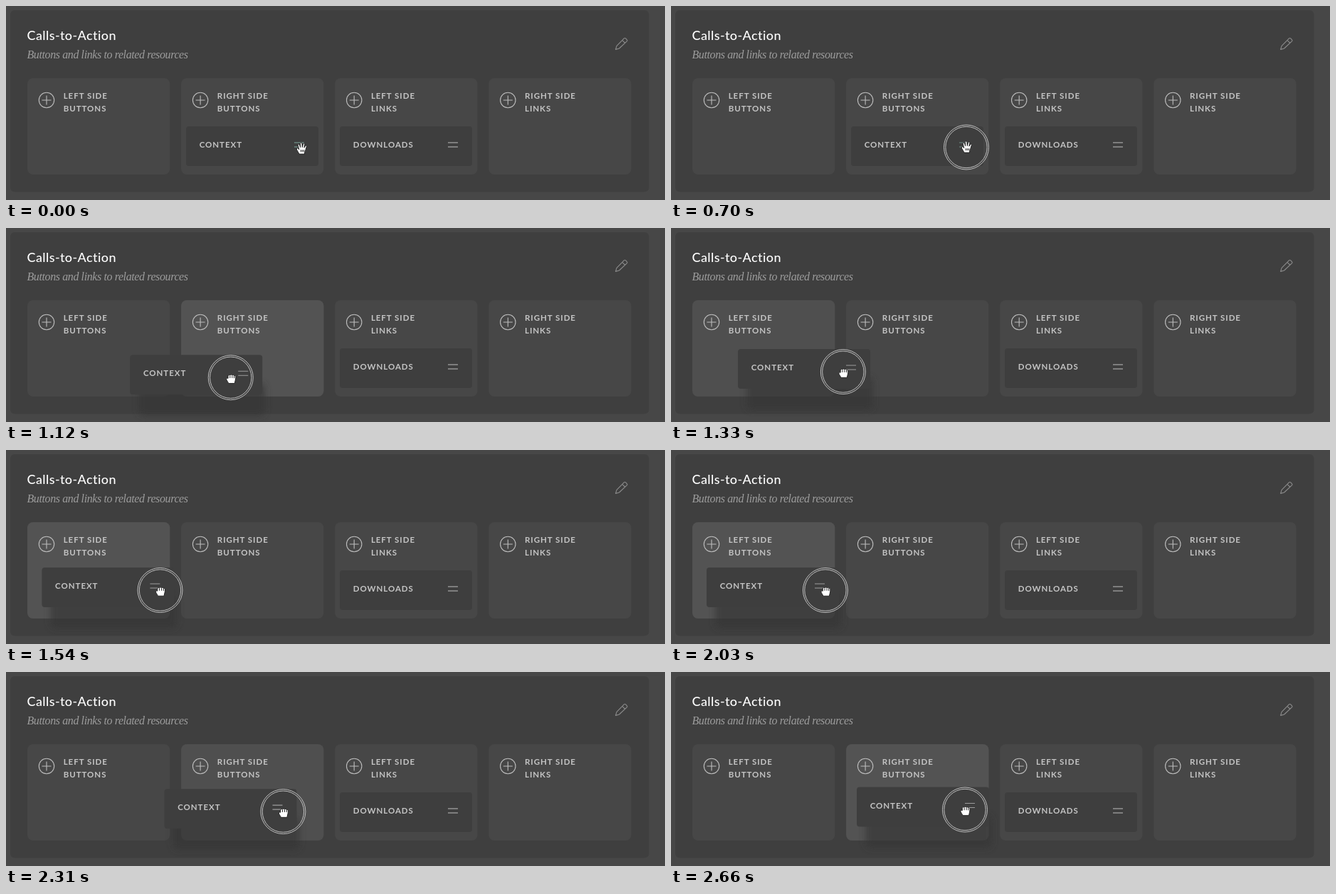
An HTML page that plays this animation: 926x274 px, repeating every 2.8 s.

```html
<!DOCTYPE html>
<html lang="en">
<head>
<meta charset="utf-8">
<title>Drag between columns</title>
<style>
html, body { margin: 0; width: 100%; height: 100%; overflow: hidden; background: #474747; }
svg { display: block; width: 926px; height: 274px; }
.title { font: 500 18px Lato, sans-serif; letter-spacing: .4px; fill: #fff; }
.sub { font: italic 16px "Liberation Serif", serif; letter-spacing: -.4px; fill: #9c9c9c; }
.label { font: 700 11.5px Lato, sans-serif; letter-spacing: .95px; fill: #c4c4c4; }
.line { fill: none; stroke: #bdbdbd; stroke-width: 1.1; }
.ring { fill: none; stroke: #cfcfcf; stroke-width: .9; }
.pencil { fill: none; stroke: #8c8c8c; stroke-width: 1.1; stroke-linejoin: round; }
.hand { fill: #fff; stroke: #222; stroke-width: 1; stroke-linejoin: round; }
</style>
</head>
<body>
<svg viewBox="0 0 926 274">
  <defs>
    <filter id="blur" x="-20%" y="-60%" width="140%" height="220%"><feGaussianBlur stdDeviation="5"/></filter>
  </defs>
  <rect x="6" y="6" width="897.5" height="256.5" rx="6" fill="#3f3f3f"/>
  <text class="title" x="29.5" y="48">Calls-to-Action</text>
  <text class="sub" x="29.5" y="74">Buttons and links to related resources</text>
  <path class="pencil" transform="translate(-.4 -.6)" d="M857 62 858.5 57 869 46.3Q870 45.4 871 46.3L873 48.4Q873.8 49.3 873 50.2L862 60.6ZM866.3 49 870.3 53"/>
  <g id="columns"></g>
  <g id="cards"></g>
  <g id="ring">
    <circle r="31.5" fill="#3f3f3f" fill-opacity=".25"/>
    <circle class="ring" r="31.5"/>
    <circle class="ring" r="29.2"/>
  </g>
  <g id="cursor" class="hand">
    <path id="open" d="M-3.5 8C-5 5-7 2.5-7.2.8-7.2-.8-5.4-.7-4.3.8L-3.8 1.5-5.3-4.5C-5.5-6.3-3.4-6.6-2.9-5L-1.9-1.5-2.1-6.7C-2-8.5.2-8.5.4-6.7L.8-1.6 2-6C2.5-7.8 4.6-7.2 4.2-5.4L3.4-1 5-3.4C6-4.6 7.5-3.8 6.8-2.3 5.6.5 5.6 3 4.3 5.2L4 8ZM-1 2V5M1 2V5M3 2V5"/>
    <path id="fist" d="M-3.6 7C-4.5 4.2-6.7 2.5-6.5.7-6.2-.8-4.8-.6-4.2 0V-3.2C-4-5.2-1.9-5.4-1.4-4.3-.9-5.7 1.2-5.7 1.6-4.3 2.3-5.4 4.2-5 4.3-3.7 5.3-4.2 6.5-3.5 6.5-2.2 6.6 1.5 5.5 4 5 7ZM-1.4-4V-.5M1.6-4V-.5M4.3-3.4V-.3"/>
  </g>
</svg>
<script>
const LOOP = 2800, TICK = 70, PRESS = 700, LIFT = 840;
const $ = id => document.getElementById(id);

const column = (side, kind, i) => `<g transform="translate(${30 + 216.1 * i} 102)">
  <rect width="200.3" height="136" rx="8" fill="#474747"/>
  <rect class="glow" width="200.3" height="136" rx="8" fill="#535353" opacity="0"/>
  <circle class="line" cx="27" cy="31" r="10.7"/>
  <path class="line" d="M20.5 31h13M27 24.5v13"/>
  <text class="label" x="50.7" y="29.2">${side} SIDE</text>
  <text class="label" x="50.7" y="47.2">${kind}</text></g>`;

const card = (id, x, name) => `<g id="${id}" transform="translate(${x} 170)">
  <rect class="shadow" x="12" y="40" width="178" height="46" rx="8" fill="#363636" opacity="0" filter="url(#blur)"/>
  <rect width="186" height="56" rx="4" fill="#3e3e3e"/>
  <text class="label" x="18.7" y="30.2">${name}</text>
  <path class="line" d="M152 23h14M152 29h14"/></g>`;

$("columns").innerHTML = ["BUTTONS", "LINKS"].map((kind, row) =>
  ["LEFT", "RIGHT"].map((side, i) => column(side, kind, 2 * row + i)).join("")).join("");
$("cards").innerHTML = card("downloads", 469, "DOWNLOADS") + card("context", 253, "CONTEXT");

const progress = (t, from, to) => Math.min(1, Math.max(0, (t - from) / (to - from)));
const ease = (t, from, to) => {
  const u = progress(t, from, to);
  return u * u * (3 - 2 * u);
};
const arc = u => Math.sin(Math.PI * u);
const glow = (t, on, off) => progress(t, on, on + 200) * (1 - progress(t, off, off + 140));
const place = (id, x, y) => $(id).setAttribute("transform", `translate(${x} ${y})`);
const show = (id, on) => $(id).setAttribute("visibility", on ? "visible" : "hidden");
const glows = document.querySelectorAll(".glow");
const shadow = document.querySelector("#context .shadow");
const handle = document.querySelector("#context .line");

function draw(now) {
  const t = Math.floor(now % LOOP / TICK) * TICK;
  const dragging = t >= LIFT;

  // the pointer drags left, then back, along shallow arcs
  const out = ease(t, 740, 1500), back = ease(t, 2020, 2390);
  const settle = 2 * (1 - progress(t, 0, 140));
  const x = 415 - 198.5 * out + 196.5 * back;
  const y = 199.5 + settle - 1.5 * out - 3.5 * back + 12.5 * arc(out) + 6 * arc(back);

  // the card trails slightly behind the pointer
  const cardX = 253 - 203 * ease(t, 795, 1560) + 211 * ease(t, 2030, 2415);
  place("context", cardX, dragging ? y - 32 : 170);
  place("ring", x, y);
  place("cursor", x + .5, y + (dragging ? 1.2 : -.4));

  show("ring", t >= PRESS);
  show("open", !dragging);
  show("fist", dragging);
  glows[0].setAttribute("opacity", glow(t, 1190, 2170));
  glows[1].setAttribute("opacity", Math.max(glow(t, 780, 1190), glow(t, 2170, LOOP)));
  shadow.setAttribute("opacity", dragging ? .65 : 0);
  handle.style.stroke = dragging ? "" : "#7fa79d";
}

const start = performance.now();
function frame() {
  draw(performance.now() - start);
  requestAnimationFrame(frame);
}
frame();
</script>
</body>
</html>
```
